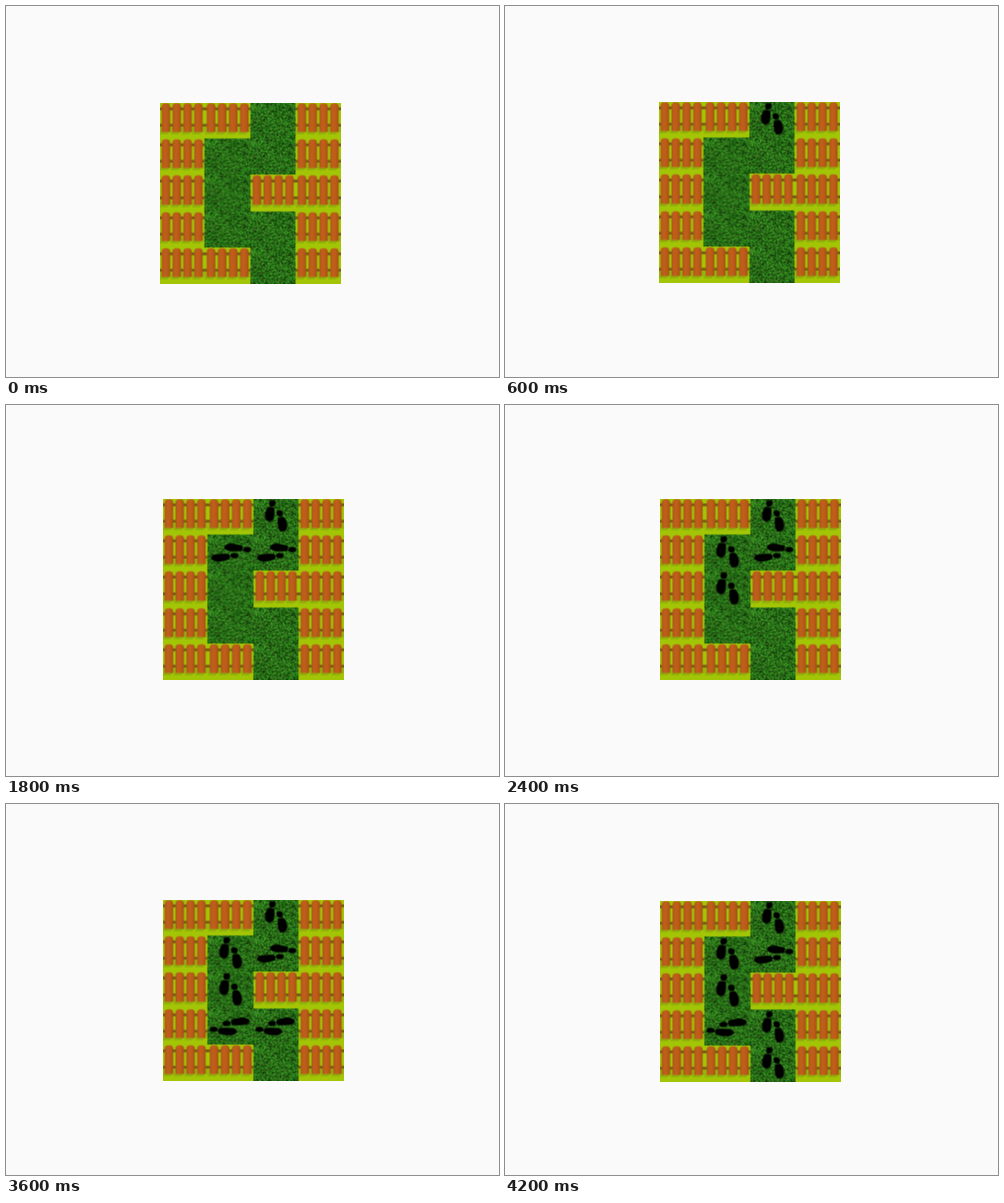
Animation, 493 px wide and 371 px high, one loop 4800 ms. Source, as an HTML page with a canvas:

```html
<!DOCTYPE html>
<html lang="en">
<head>
<meta charset="utf-8">
<title>Garden path</title>
<style>
  html, body { margin: 0; width: 100%; height: 100%; overflow: hidden; background: #fafafa; }
  canvas { display: block; }
</style>
</head>
<body>
<canvas id="stage" width="493" height="371"></canvas>
<script>
const COLS = 4, ROWS = 5, SIZE = 181, STEP = 600;
const TILE_W = SIZE / COLS, TILE_H = SIZE / ROWS;

function makeCanvas(width, height) {
  return Object.assign(document.createElement('canvas'), { width, height });
}
const stage = document.getElementById('stage').getContext('2d');
const board = makeCanvas(SIZE, SIZE);
const ctx = board.getContext('2d');

// Cells of the path as [column, row], in walking order
const path = [[2, 0], [2, 1], [1, 1], [1, 2], [1, 3], [2, 3], [2, 4]];
// The board jitters a little with every step
const origins = [[153, 96], [153, 95], [154, 93], [156, 93],
                 [154, 93], [153, 94], [156, 95], [154, 96]];

function makeGrass() {
  const tile = makeCanvas(45, 36);
  const g = tile.getContext('2d');
  let seed = 7;
  const random = () => (seed = seed * 16807 % 2147483647) / 2147483647;
  for (let y = 0; y < tile.height; y++) {
    for (let x = 0; x < tile.width; x++) {
      const light = random();
      const warm = random();
      g.fillStyle = `rgb(${light * 45 + warm * 35}, ${52 + light * 110}, ${light * 30 + warm * 16})`;
      g.fillRect(x, y, 1, 1);
    }
  }
  return tile;
}
const grass = makeGrass();

function rect(color, x, y, w, h) {
  ctx.fillStyle = color;
  ctx.fillRect(x, y, w, h);
}

function drawFence() {
  rect('#a2c606', 0, 0, TILE_W, TILE_H);
  rect('#94b50a', 0, 25, TILE_W, 5);
  ctx.fillStyle = '#8fae0c';
  for (let i = 0; i < 4; i++) {
    const x = 2.2 + i * 10.9;
    ctx.beginPath();
    ctx.moveTo(x, 28);
    ctx.lineTo(x + 8.4, 28);
    ctx.lineTo(x + 6, 32);
    ctx.lineTo(x - 2, 32);
    ctx.fill();
  }
  for (const y of [5, 21.5]) rect('#75590f', 0, y, TILE_W, 2.8);
  for (let i = 0; i < 4; i++) {
    const x = 2.2 + i * 10.9;
    const shade = ctx.createLinearGradient(x, 0, x + 8.4, 0);
    shade.addColorStop(0, '#ae541a');
    shade.addColorStop(0.35, '#c0601b');
    shade.addColorStop(0.7, '#bb5b18');
    shade.addColorStop(1, '#a44f15');
    ctx.fillStyle = shade;
    ctx.beginPath();
    ctx.roundRect(x, 0.8, 8.5, 28.8, [3.6, 3.6, 0.5, 0.5]);
    ctx.fill();
  }
}

// A shoe print in a 100 x 100 cell, heel above the sole
function drawFoot(x, y, side) {
  ctx.save();
  ctx.translate(x, y);
  ctx.scale(side, 1);
  ctx.beginPath();
  ctx.moveTo(-5, -19);
  ctx.quadraticCurveTo(4, -23, 9.5, -17);
  ctx.bezierCurveTo(11, -8, 10, 2, 9, 9);
  ctx.bezierCurveTo(7, 24, -7, 24, -10.5, 10);
  ctx.bezierCurveTo(-12.5, 0, -9, -10, -5, -19);
  ctx.fill();
  ctx.beginPath();
  ctx.ellipse(5.5, -30, 7.3, 8.8, 0.15, 0, 2 * Math.PI);
  ctx.fill();
  ctx.restore();
}

function drawSteps(dx, dy) {
  ctx.scale(TILE_W / 100, TILE_H / 100);
  ctx.translate(50, 50);
  ctx.rotate(Math.atan2(dy, dx) - Math.PI / 2);
  ctx.translate(-50, -50);
  ctx.fillStyle = '#000';
  drawFoot(36.5, 43.5, 1);
  drawFoot(64, 71.5, -1);
}

// Draws a tile into its cell, with the cell's edges on whole pixels
function inCell(col, row, draw) {
  const [x, right] = [col, col + 1].map(n => Math.round(n * TILE_W));
  const [y, bottom] = [row, row + 1].map(n => Math.round(n * TILE_H));
  ctx.save();
  ctx.translate(x, y);
  ctx.scale((right - x) / TILE_W, (bottom - y) / TILE_H);
  draw();
  ctx.restore();
}

// Prints point to the next walked cell; the newest keeps its arrival direction
function heading(i, walked) {
  const from = i + 1 < walked ? i : i - 1;
  if (from < 0) return [0, 1];
  const [a, b] = [path[from], path[from + 1]];
  return [b[0] - a[0], b[1] - a[1]];
}

function drawBoard(walked) {
  for (let row = 0; row < ROWS; row++) {
    for (let col = 0; col < COLS; col++) inCell(col, row, drawFence);
  }
  for (const [col, row] of path) {
    inCell(col, row, () => ctx.drawImage(grass, 0, 0, TILE_W, TILE_H));
  }
  for (let i = 0; i < walked; i++) {
    inCell(...path[i], () => drawSteps(...heading(i, walked)));
  }
}

function drawStage(walked) {
  const [left, top] = origins[walked];
  drawBoard(walked);
  stage.fillStyle = '#fafafa';
  stage.fillRect(0, 0, 493, 371);
  stage.drawImage(board, left + 0.5, top + 0.5);
}

const start = performance.now();
function tick() {
  const elapsed = performance.now() - start;
  drawStage(Math.floor(elapsed / STEP) % origins.length);
  requestAnimationFrame(tick);
}
tick();
</script>
</body>
</html>
```
